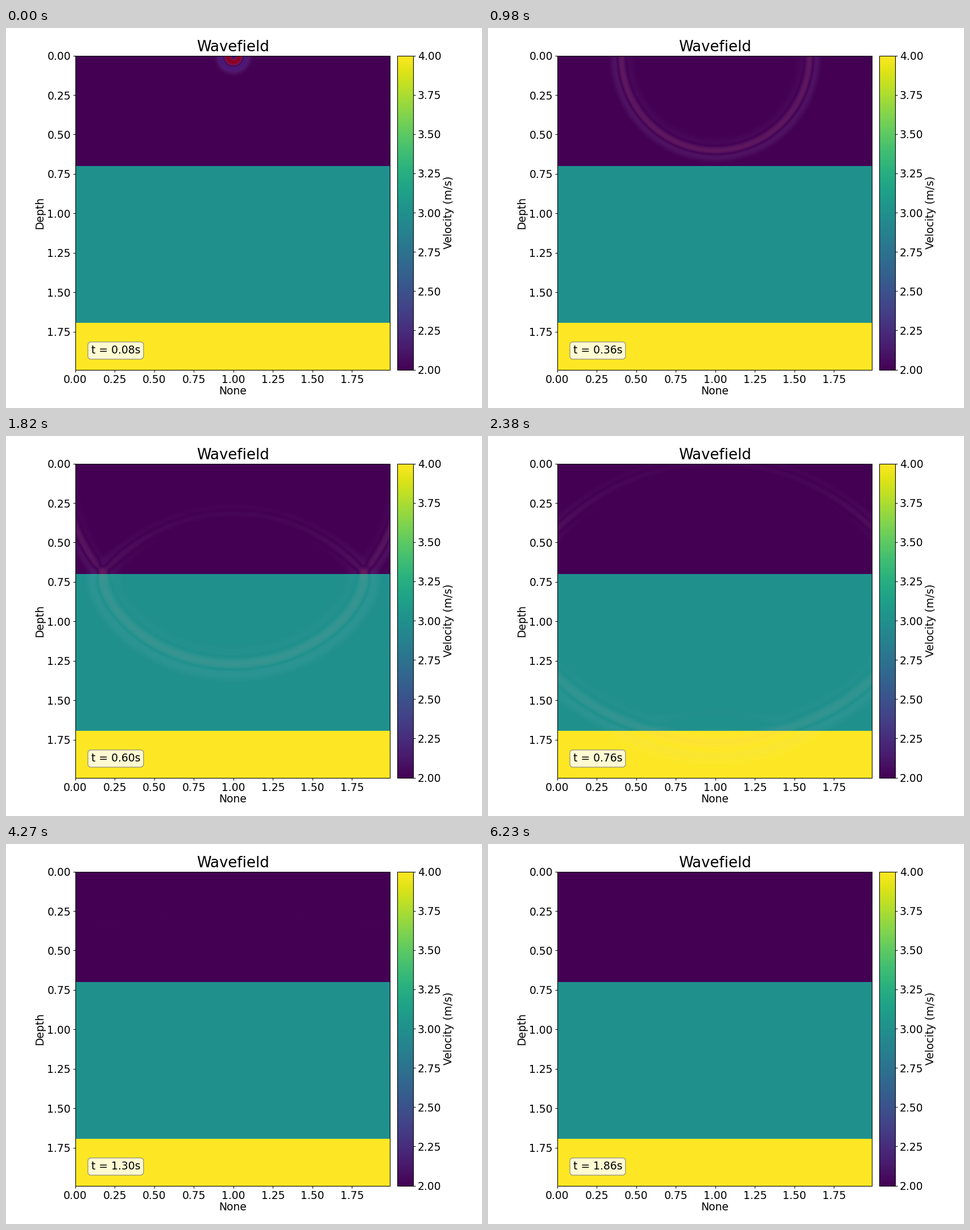
Write a matplotlib script that moves like this. It is 837 px wide and 669 px high and loops after 6300 ms.

```python
import numpy as np
import matplotlib.pyplot as plt
from matplotlib.animation import FuncAnimation

W, H, DPI = 837, 669, 96
FRAMES, INTERVAL = 90, 70
T_START, T_STEP = 0.08, 0.02

N, PAD = 200, 50            # visible cells, absorbing border
DX, DT = 0.01, 0.001
PEAK_FREQ, PEAK_TIME = 19.0, 0.056
SIDE = 553                  # plot side in pixels
EXTENT = (0, 1.99, 1.99, 0)

plt.rcParams.update({"font.family": "DejaVu Sans", "font.size": 14.1})


def layered_velocity():
    """Three flat layers, extended into the absorbing border."""
    depth = np.arange(N + 2 * PAD) - PAD
    layers = np.select([depth < 70, depth < 170], [2.0, 3.0], 4.0)
    return np.repeat(layers[:, None], depth.size, axis=1)


def border_damping():
    """Damping rate that grows quadratically towards the outer edges."""
    i = np.arange(N + 2 * PAD)
    gap = np.maximum(np.maximum(PAD - i, i - (N + PAD - 1)), 0) / PAD
    ramp = 60 * gap ** 2
    return ramp[:, None] + ramp[None, :]


def ricker(t):
    a = (np.pi * PEAK_FREQ * (t - PEAK_TIME)) ** 2
    return (1 - 2 * a) * np.exp(-a)


def laplacian(p):
    """Eighth-order stencil, valid four cells in from the edge."""
    n = p.shape[0]
    out = (-205 / 36) * p[4:-4, 4:-4]
    for k, w in enumerate((8 / 5, -1 / 5, 8 / 315, -1 / 560), start=1):
        lo, hi = slice(4 - k, n - 4 - k), slice(4 + k, n - 4 + k)
        out += w * (p[lo, 4:-4] + p[hi, 4:-4] + p[4:-4, lo] + p[4:-4, hi])
    return out


def simulate(vel):
    """Acoustic wavefield at every frame time, scaled for display."""
    core = (slice(4, -4), slice(4, -4))
    courant = ((vel * DT / DX) ** 2).astype(np.float32)[core]
    half = (border_damping() * DT / 2).astype(np.float32)[core]
    keep, gain = 1 - half, 1 / (1 + half)
    old = np.zeros(vel.shape, np.float32)
    cur = np.zeros_like(old)
    first, every = round(T_START / DT), round(T_STEP / DT)
    snaps = []
    for step in range(first + every * (FRAMES - 1) + 1):
        if step >= first and (step - first) % every == 0:
            snaps.append(cur.copy())
        new = np.zeros_like(cur)
        new[core] = gain * (2 * cur[core] - keep * old[core]
                            + courant * laplacian(cur))
        new[PAD, PAD + N // 2] += ricker(step * DT)
        old, cur = cur, new
    snaps = np.array(snaps)
    return snaps * (0.19 / snaps[8].max())


def sinc_matrix():
    """Band-limited interpolation from grid cells to plot pixels."""
    pixel = (np.arange(SIDE) + 0.5) * N / SIDE - 0.5 + PAD
    cell = np.arange(N + 2 * PAD)
    return np.sinc(pixel[:, None] - cell[None, :]).astype(np.float32)


def box(x0, y0, x1, y1):
    """Axes rectangle from pixel corners measured from the top left."""
    return [x0 / W, 1 - y1 / H, (x1 - x0) / W, (y1 - y0) / H]


def label(x, y, text, **kw):
    fig.text(x / W, 1 - y / H, text, ha="center", va="baseline",
             rotation_mode="anchor", **kw)


velocity = layered_velocity()
waves = simulate(velocity)
to_pixels = sinc_matrix()

fig = plt.figure(figsize=(W / DPI, H / DPI), dpi=DPI, facecolor="white")
ax = fig.add_axes(box(122, 48.55, 122 + SIDE, 48.55 + SIDE))
cax = fig.add_axes(box(688, 48.55, 715.7, 48.55 + SIDE))

style = dict(extent=EXTENT, aspect="auto", interpolation="nearest")
ground = ax.imshow(velocity[PAD:-PAD, PAD:-PAD], cmap="viridis",
                   vmin=2, vmax=4, **style)
wave = ax.imshow(np.zeros((SIDE, SIDE)), cmap="seismic",
                 vmin=-0.77, vmax=0.77, **style)

ticks = np.arange(0, 2, 0.25)
names = [f"{v:.2f}" for v in ticks]
ax.set_xticks(ticks, names)
ax.set_yticks(ticks, names)
bar = fig.colorbar(ground, cax=cax)
bar.set_ticks(np.arange(2, 4.01, 0.25))
bar.ax.set_yticklabels([f"{v:.2f}" for v in np.arange(2, 4.01, 0.25)])
for a in (ax, cax):
    a.tick_params(length=3, pad=3, width=0.8)

label(399, 41, "Wavefield", fontsize=19.5)
label(398.5, 645, "None")
label(65, 325, "Depth", rotation=90)
label(783.6, 324.5, "Velocity (m/s)", rotation=90)

clock = ax.text(0.05, 0.051, "", transform=ax.transAxes,
                bbox=dict(boxstyle="round", facecolor="white",
                          edgecolor="gray", alpha=0.8))


def update(i):
    field = to_pixels @ waves[i] @ to_pixels.T
    wave.set_data(field)
    wave.set_alpha(np.clip(np.abs(field), 0, 1))
    clock.set_text(f"t = {T_START + T_STEP * i:.2f}s")
    return wave, clock


anim = FuncAnimation(fig, update, frames=FRAMES, interval=INTERVAL,
                     init_func=lambda: update(0), repeat=True, repeat_delay=0)
plt.show()
```
